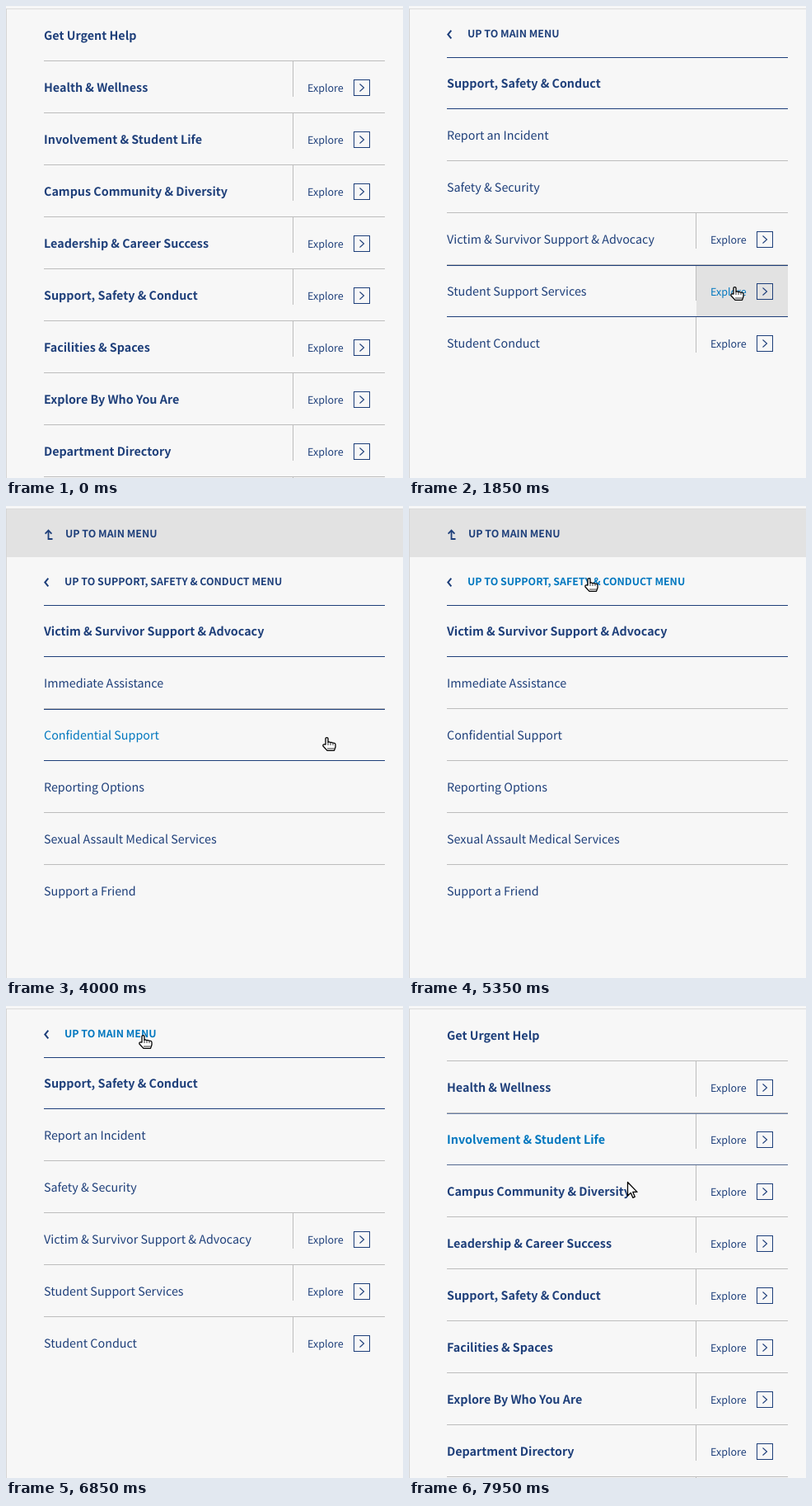
These frames come from a looping animation (482x572 px, 8 s). An HTML page with a canvas:

```html
<!DOCTYPE html>
<html lang="en">
<head>
<meta charset="utf-8">
<title>Sliding menu</title>
<style>
  html, body { margin: 0; width: 100%; height: 100%; overflow: hidden; background: #f7f7f7; }
  canvas { display: block; }
</style>
</head>
<body>
<canvas id="stage" width="482" height="572"></canvas>
<script>
const ctx = document.getElementById('stage').getContext('2d');
const W = 482, H = 572, LOOP = 8000, STEP = 50, ROW = 63;
const LEFT = 46, RIGHT = 460, SPLIT = 348;

const BG = [247, 247, 247], SHADE = [226, 226, 226], RULE = [189, 189, 189];
const NAVY = [30, 63, 122], BLUE = [0, 119, 191], DARK = [48, 50, 56];

const FAMILY = '"Noto Sans CJK JP", "Noto Sans CJK SC", "Noto Sans CJK", "Noto Sans", sans-serif';
const FONT = {
  item: `400 14.32px ${FAMILY}`,
  title: `700 14.32px ${FAMILY}`,
  small: `400 12.53px ${FAMILY}`,
  back: `700 12.4px ${FAMILY}`
};

// A leading ">" marks a row with an Explore button.
const MAIN = ['Get Urgent Help', '>Health & Wellness', '>Involvement & Student Life',
  '>Campus Community & Diversity', '>Leadership & Career Success', '>Support, Safety & Conduct',
  '>Facilities & Spaces', '>Explore By Who You Are', '>Department Directory', '>'];
const SUPPORT = ['Report an Incident', 'Safety & Security', '>Victim & Survivor Support & Advocacy',
  '>Student Support Services', '>Student Conduct'];
const ADVOCACY = ['Immediate Assistance', 'Confidential Support', 'Reporting Options',
  'Sexual Assault Medical Services', 'Support a Friend'];

// [menu, row, zone, on, off, line colour]
const HOVERS = [
  ['main', 4, 'explore', 350, 430, DARK],
  ['main', 5, 'explore', 450, 4000, DARK],
  ['main', 5, 'line', 4000, 7200, DARK],
  ['main', 0, 'text', 7200, 7700, NAVY],
  ['main', 1, 'text', 7700, 7780, NAVY],
  ['main', 2, 'text', 7850, 9000, NAVY],
  ['support', 3, 'explore', 1680, 2300, NAVY],
  ['support', 2, 'explore', 2380, 4000, NAVY],
  ['support', 2, 'line', 4000, 5650, DARK],
  ['support', 'head', 'text', 5400, 6150, NAVY],
  ['support', 'back', 'text', 6350, 9000, NAVY],
  ['advocacy', 1, 'text', 3800, 4400, NAVY],
  ['advocacy', 'back', 'text', 4480, 6000, NAVY]
];

// [time, x, y] of the pointer's top left corner
const POINTER = [
  [0, 466, 545], [50, 466, 524], [250, 463, 222], [400, 430, 285], [600, 390, 340],
  [2150, 390, 340], [2500, 384, 280], [4350, 384, 280], [4600, 213, 87],
  [6000, 213, 87], [6450, 161, 35], [7600, 161, 35], [7950, 265, 213]
];

const HAND = new Path2D('M4 9V2.2Q4 .7 5.5 .7Q7 .7 7 2.2V6.2Q8.6 5.4 9.8 6.6Q11.4 5.9 12.6 7.1Q16 6.8 16 9.2V12L14.5 16.4H6L1 11Q.4 8.8 2.4 8.9Z');
const KNUCKLES = new Path2D('M7 6V10M10 7V10M13 7.5V10M6 14H14.5');
const ARROW = new Path2D('M.5 .5V17L4.3 13.4L6.8 19.3L9.3 18.2L6.8 12.4H12Z');

const clamp = v => Math.max(0, Math.min(1, v));
const ramp = (t, start, span) => clamp((t - start) / span);
const mix = (a, b, k) => a.map((v, i) => v + (b[i] - v) * k);
const css = c => `rgb(${c.map(Math.round).join()})`;

function box(x, y, w, h, color) {
  ctx.fillStyle = css(color);
  ctx.fillRect(x, y, w, h);
}

function text(str, x, y, font, color) {
  ctx.font = font;
  ctx.fillStyle = css(color);
  ctx.fillText(str, x, y);
}

function stroke(points, width) {
  ctx.beginPath();
  points.forEach(([x, y]) => ctx.lineTo(x, y));
  ctx.lineWidth = width;
  ctx.strokeStyle = css(NAVY);
  ctx.stroke();
}

function hoverOf(menu, row, t) {
  const heat = { text: 0, explore: 0, line: 0, color: NAVY };
  for (const [m, r, zone, on, off, color] of HOVERS) {
    if (m !== menu || r !== row) continue;
    const k = ramp(t, on, 150) * (1 - ramp(t, off, 150));
    heat[zone] = Math.max(heat[zone], k);
    if (k > 0 && k >= heat.line) {
      heat.line = k;
      heat.color = color;
    }
  }
  return heat;
}

const linkColor = k => mix(NAVY, BLUE, clamp(k * 1.6));

function explore(top, heat, pressed) {
  if (heat) box(SPLIT + 1, top + 1, RIGHT - SPLIT - 1, ROW - 1, mix(BG, SHADE, heat));
  box(SPLIT, top + 1, 1, 43, RULE);
  text('Explore', 366, top + 38, FONT.small, linkColor(heat * (1 - pressed * 0.6)));
  ctx.lineWidth = 1;
  ctx.strokeStyle = css(NAVY);
  ctx.strokeRect(422.5, top + 23.5, 19, 19);
  stroke([[429.5, top + 28.5], [434.5, top + 33], [429.5, top + 37.5]], 1.1);
}

function rows(menu, labels, top, font, t, firstRule) {
  const heats = labels.map((_, i) => hoverOf(menu, i, t));
  labels.forEach((label, i) => {
    const y = top + i * ROW, heat = heats[i];
    if (i || firstRule) box(LEFT, y, RIGHT - LEFT, 1, RULE);
    if (label[0] === '>') {
      const pressed = menu === 'main' && i === 5 ? ramp(t, 950, 100) : 0;
      explore(y, heat.explore, pressed);
    }
    text(label.replace('>', ''), LEFT, y + 38, font, linkColor(heat.text));
  });
  heats.forEach(({ line, color }, i) => {
    if (!line) return;
    const y = top + i * ROW, shade = mix(RULE, color, line);
    box(LEFT, y + 1, RIGHT - LEFT, 1, mix(BG, color, line));
    box(LEFT, y + ROW, RIGHT - LEFT, 1, shade);
  });
}

function heading(menu, backLabel, title, top, t) {
  stroke([[51.3, top - 32.3], [47.3, top - 27.5], [51.3, top - 22.7]], 2);
  text(backLabel, 71, top - 24, FONT.back, linkColor(hoverOf(menu, 'back', t).text));
  text(title, LEFT, top + 37, FONT.title, linkColor(hoverOf(menu, 'head', t).text));
  box(LEFT, top, RIGHT - LEFT, 1, NAVY);
  box(LEFT, top + 62, RIGHT - LEFT, 1, NAVY);
}

function panel(offset, draw) {
  if (offset >= 1) return;
  ctx.save();
  ctx.translate(Math.round(offset * W), 0);
  box(1, 4, W, H, BG);
  draw();
  ctx.restore();
}

function supportMenu(t) {
  rows('support', SUPPORT, 124, FONT.item, t, false);
  heading('support', 'UP TO MAIN MENU', 'Support, Safety & Conduct', 62, t);
}

function advocacyMenu(t) {
  const labels = t >= 5400 ? ADVOCACY.slice(0, -1) : ADVOCACY;
  box(1, 4, W, 58, SHADE);
  stroke([[47.6, 33.6], [51.5, 29.6], [55.4, 33.6]], 1.8);
  stroke([[51.5, 30], [51.5, 40], [56.5, 40]], 1.8);
  text('UP TO MAIN MENU', 72, 38, FONT.back, NAVY);
  rows('advocacy', labels, 182, FONT.item, t, false);
  if (labels !== ADVOCACY) box(LEFT, 434, RIGHT - LEFT, 1, RULE);
  heading('advocacy', 'UP TO SUPPORT, SAFETY & CONDUCT MENU', 'Victim & Survivor Support & Advocacy', 120, t);
}

function pointer(t) {
  if (t < 50) return;
  const next = Math.max(1, POINTER.findIndex(p => p[0] >= t));
  const [t0, x0, y0] = POINTER[next - 1], [t1, x1, y1] = POINTER[next];
  const p = ramp(t, t0, t1 - t0), k = p * p * (3 - 2 * p);
  const arrow = t < 350 || t >= 7900;
  ctx.save();
  ctx.translate(Math.round(x0 + (x1 - x0) * k), Math.round(y0 + (y1 - y0) * k));
  ctx.fillStyle = '#fff';
  ctx.strokeStyle = '#000';
  ctx.lineWidth = 1.3;
  ctx.lineJoin = 'round';
  ctx.fill(arrow ? ARROW : HAND);
  ctx.stroke(arrow ? ARROW : HAND);
  if (!arrow) {
    ctx.lineWidth = 0.8;
    ctx.stroke(KNUCKLES);
  }
  ctx.restore();
}

// 1 = off stage to the right, 0 = fully open
const slide = (t, open, close) => 1 - ramp(t, open, 400) + ramp(t, close, 400);

function render(t) {
  ctx.textRendering = 'geometricPrecision';
  box(0, 0, W, H, BG);
  rows('main', MAIN, 3, FONT.title, t, true);
  panel(slide(t, 1396, 6946), () => supportMenu(t));
  panel(slide(t, 3590, 5396), () => advocacyMenu(t));
  box(0, 3, W, 1, [220, 220, 220]);
  box(0, 3, 1, H, [214, 214, 214]);
  pointer(t);
}

const start = performance.now();
function tick() {
  const t = (performance.now() - start) % LOOP;
  render(Math.floor(t / STEP) * STEP);
  requestAnimationFrame(tick);
}
tick();
</script>
</body>
</html>
```
